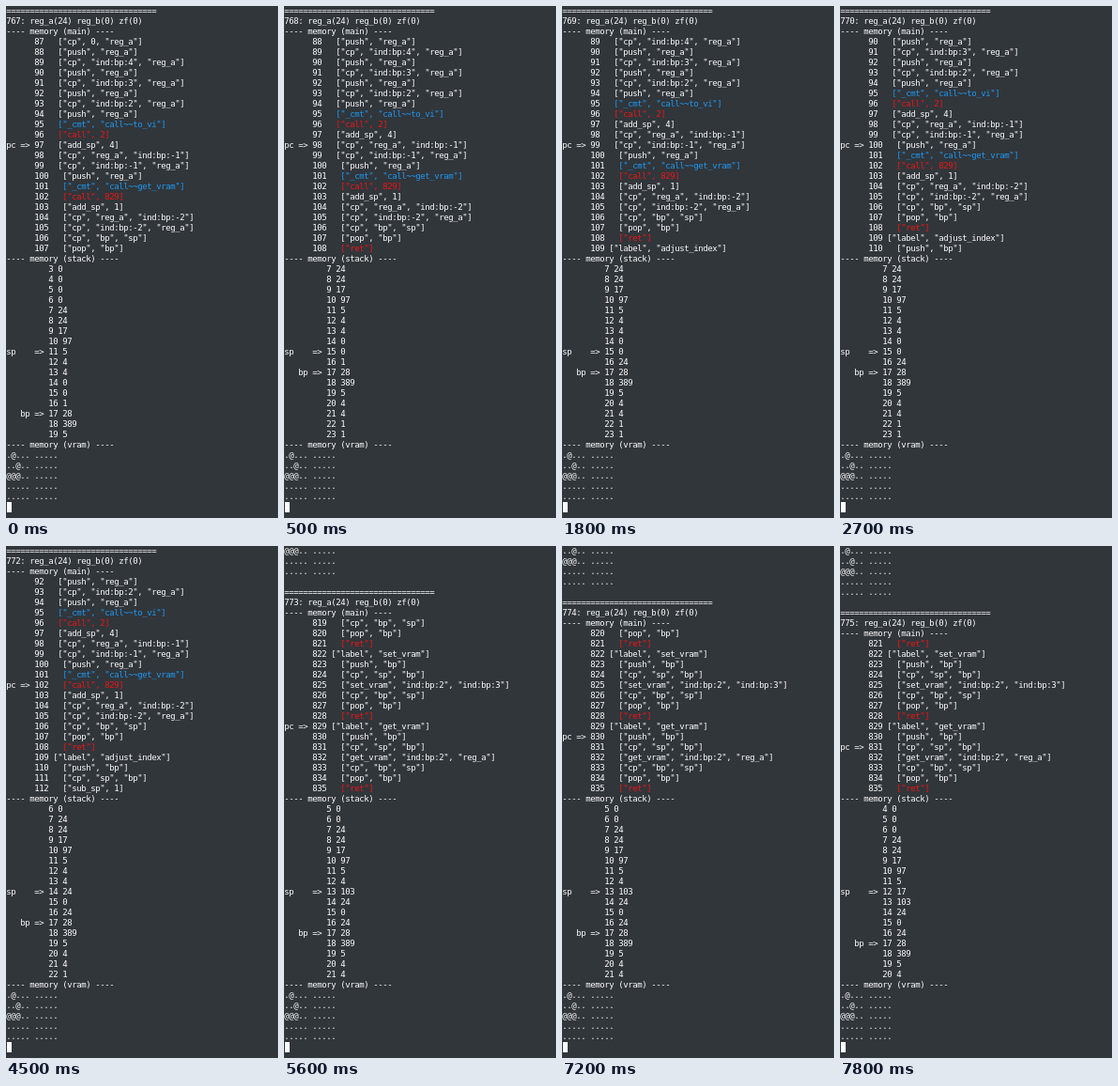
Animation, 290 px wide and 545 px high, one loop 8000 ms. Source, as an HTML page with a canvas:

```html
<!DOCTYPE html>
<html lang="en">
<head>
<meta charset="utf-8">
<title>VM step debugger</title>
<style>
html, body { margin: 0; width: 290px; height: 545px; overflow: hidden; background: #31363b; }
canvas { display: block; }
</style>
</head>
<body>
<canvas id="term" width="290" height="545"></canvas>
<script>
const ctx = document.getElementById('term').getContext('2d');
const CELL = 5, LINE = 11, ROWS = 49, LOOP = 8000;
const BG = '#31363b', FG = '#fcfcfc', RED = '#ed1515', BLUE = '#1d99f3';
const BP = 17;

// Program listing: start address, then one instruction per item
const program = {};
function load(start, source) {
  source.trim().split(/\s*\n\s*/).forEach((line, i) => {
    program[start + i] = line.split(' ').map(p => /^\d+$/.test(p) ? +p : p);
  });
}
load(87, `
  cp 0 reg_a
  push reg_a
  cp ind:bp:4 reg_a
  push reg_a
  cp ind:bp:3 reg_a
  push reg_a
  cp ind:bp:2 reg_a
  push reg_a
  _cmt call~~to_vi
  call 2
  add_sp 4
  cp reg_a ind:bp:-1
  cp ind:bp:-1 reg_a
  push reg_a
  _cmt call~~get_vram
  call 829
  add_sp 1
  cp reg_a ind:bp:-2
  cp ind:bp:-2 reg_a
  cp bp sp
  pop bp
  ret
  label adjust_index
  push bp
  cp sp bp
  sub_sp 1`);
load(819, `
  cp bp sp
  pop bp
  ret
  label set_vram
  push bp
  cp sp bp
  set_vram ind:bp:2 ind:bp:3
  cp bp sp
  pop bp
  ret
  label get_vram
  push bp
  cp sp bp
  get_vram ind:bp:2 reg_a
  cp bp sp
  pop bp
  ret`);

// Stack contents from address 3 upwards
const stack = [0, 0, 0, 0, 24, 24, 17, 97, 5, 4, 4, 0, 0, 1, 28, 389, 5, 4, 4, 1, 1];
const vram = ['.@... .....', '..@.. .....', '@@@.. .....', '..... .....', '..... .....'];

// write: [address, value] stored on entering the step
const steps = [
  { at: 0, pc: 97, sp: 11 },
  { at: 500, pc: 98, sp: 15 },
  { at: 1800, pc: 99, sp: 15, write: [16, 24] },
  { at: 2700, pc: 100, sp: 15 },
  { at: 3600, pc: 101, sp: 14, write: [14, 24] },
  { at: 4500, pc: 102, sp: 14 },
  { at: 5600, pc: 829, sp: 13, write: [13, 103] },
  { at: 7200, pc: 830, sp: 13 },
  { at: 7800, pc: 831, sp: 12, write: [12, 17] }
];

const colorOf = op => op === '_cmt' ? BLUE : op === 'call' || op === 'ret' ? RED : FG;

function codeLine(addr, pc) {
  const ins = program[addr];
  const head = (addr === pc ? 'pc => ' : '      ') + addr + (ins[0] === 'label' ? ' ' : '   ');
  const body = '[' + ins.map(p => JSON.stringify(p)).join(', ') + ']';
  return { head, body, color: colorOf(ins[0]) };
}

function stackLine(addr, sp, mem) {
  const mark = addr === sp ? 'sp    => ' : addr === BP ? '   bp => ' : '         ';
  return { head: mark + addr + ' ' + mem[addr - 3] };
}

function screen(index) {
  const { pc, sp } = steps[index];
  const mem = stack.slice();
  for (const { write } of steps.slice(0, index + 1)) {
    if (write) mem[write[0] - 3] = write[1];
  }
  const plain = head => ({ head });
  const lines = [...vram, '', '='.repeat(32),
    `${767 + index}: reg_a(24) reg_b(0) zf(0)`, '---- memory (main) ----'].map(plain);
  for (let a = pc - 10; a <= pc + 10; a++) {
    if (program[a]) lines.push(codeLine(a, pc));
  }
  lines.push(plain('---- memory (stack) ----'));
  for (let a = sp - 8; a <= sp + 8; a++) lines.push(stackLine(a, sp, mem));
  lines.push(plain('---- memory (vram) ----'), ...vram.map(plain));
  return lines.slice(1 - ROWS);
}

function put(text, col, row, color) {
  ctx.fillStyle = color;
  [...text].forEach((ch, i) => {
    if (ch !== ' ') ctx.fillText(ch, (col + i) * CELL + 3, row * LINE + 8);
  });
}

function draw(index) {
  ctx.fillStyle = BG;
  ctx.fillRect(0, 0, 290, 545);
  ctx.font = '9px "DejaVu Sans Mono", monospace';
  ctx.textAlign = 'center';
  screen(index).forEach(({ head, body, color }, row) => {
    put(head, 0, row, FG);
    if (body) put(body, head.length, row, color);
  });
  ctx.fillStyle = FG;
  ctx.fillRect(1, (ROWS - 1) * LINE, CELL, LINE);
}

let shown = -1;
const start = performance.now();
function tick() {
  const t = (performance.now() - start) % LOOP;
  const index = steps.filter(s => s.at <= t).length - 1;
  if (index !== shown) draw(shown = index);
  requestAnimationFrame(tick);
}
tick();
</script>
</body>
</html>
```
